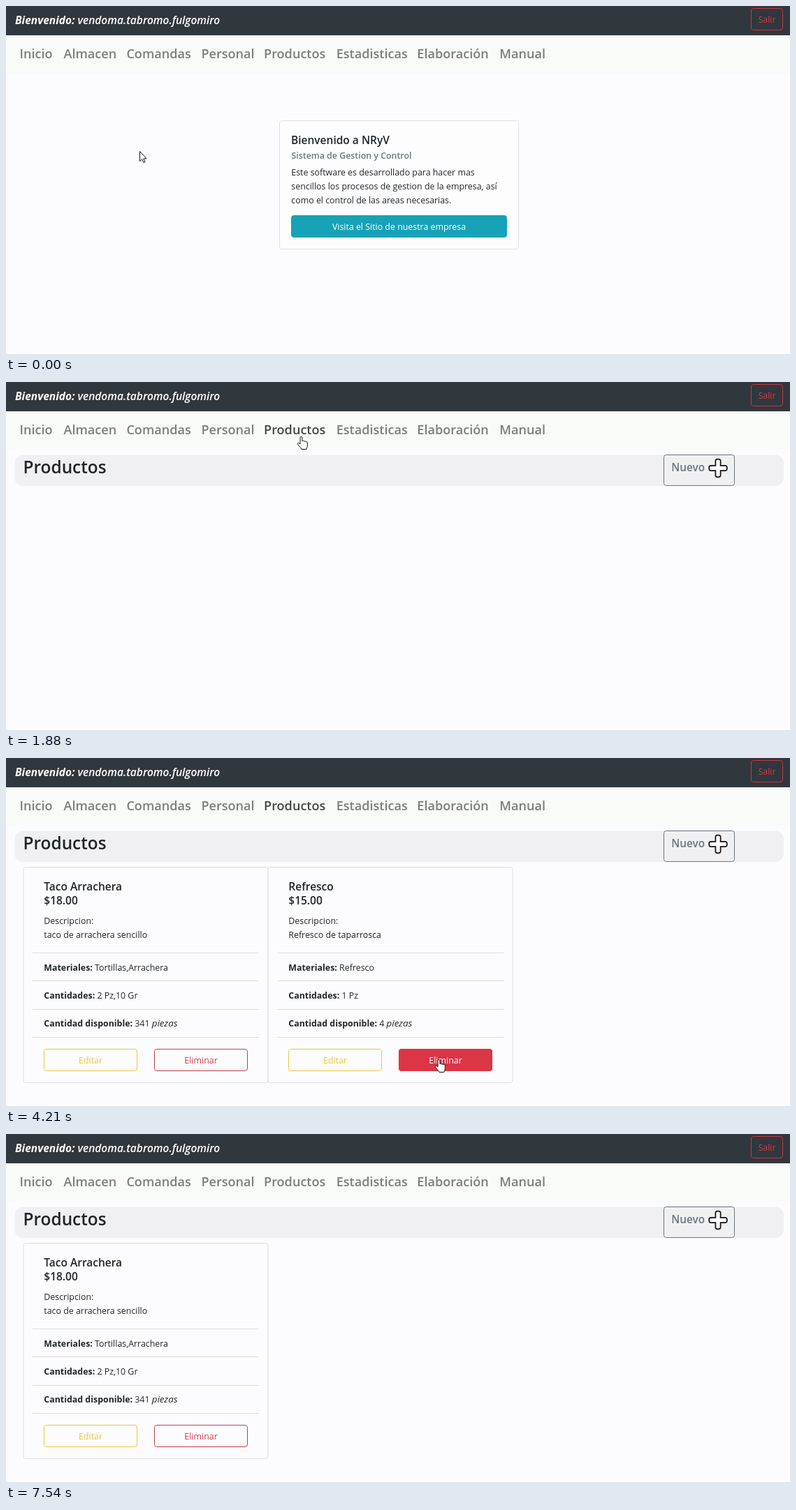
Write an HTML page that moves like this. It is 1122 px wide and 499 px high and loops after 8.04 s.

```html
<!DOCTYPE html>
<html lang="es">
<head>
<meta charset="utf-8">
<title>Productos</title>
<style>
  html, body { margin: 0; width: 100%; height: 100%; overflow: hidden; background: #fcfcfe; }
  svg { display: block; width: 1122px; height: 499px; }
  text { font: 12.4px "Open Sans", "Noto Sans", sans-serif; fill: #212529; white-space: pre; }
  .user { font-size: 15.5px; font-weight: 600; font-style: italic; fill: #fff; }
  .nav { font-size: 18.1px; font-weight: 600; fill: rgba(0, 0, 0, .5); }
  .title { font-size: 24.4px; font-weight: 600; }
  .head { font-size: 15.5px; font-weight: 600; }
  .sub { font-weight: 600; fill: #6c757d; }
  .new { font-size: 15.3px; font-weight: 600; fill: #6c757d; }
  .mid { text-anchor: middle; }
  .b { font-weight: 700; }
  .i { font-size: 13.3px; font-style: italic; }
  .white { fill: #fff; }
  .red { fill: #cf3c4b; }
  .yellow { fill: #ecc43a; }
</style>
</head>
<body>
<svg id="stage" viewBox="0 0 1122 499"></svg>
<script>
const LOOP = 8040, STEP = 1000 / 24;

const text = (x, y, str, cls = "") => `<text x="${x}" y="${y}" class="${cls}">${str}</text>`;
const box = (x, y, w, h, fill, stroke = "none", r = 3.3) =>
  `<rect x="${x}" y="${y}" width="${w}" height="${h}" rx="${r}" fill="${fill}" stroke="${stroke}"/>`;
const group = (id, body) => `<g id="${id}">${body}</g>`;
const span = (cls, str) => `<tspan class="${cls}">${str}</tspan>`;

const links = [["Inicio", 19.5], ["Almacen", 82.5], ["Comandas", 172.4], ["Personal", 279.4],
  ["Productos", 369], ["Estadisticas", 472.7], ["Elaboración", 588.3], ["Manual", 706.3]];

function header() {
  return box(0, 0, 1122, 42, "#30373d", "none", 0) +
    box(0, 42, 1122, 55, "#f9fbf9", "none", 0) +
    text(13, 25.5, span("b", "Bienvenido:") + " vendoma.tabromo.fulgomiro", "user") +
    box(1066.5, 3.5, 45, 31, "none", "#c23a48") +
    text(1089, 24, "Salir", "mid red") +
    links.map(([label, x]) => text(x, 75, label, "nav")).join("");
}

function home() {
  return box(391.5, 164.5, 342, 184, "#fdfdfe", "#dedfe0") +
    text(408, 197.5, "Bienvenido a NRyV", "head") +
    text(408.5, 219, "Sistema de Gestion y Control", "sub") +
    ["Este software es desarrollado para hacer mas",
     "sencillos los procesos de gestion de la empresa, así",
     "como el control de las areas necesarias."]
      .map((line, i) => text(408.3, 242.8 + i * 20, line)).join("") +
    box(408.5, 300.5, 308, 31, "#17a2b8", "#17a2b8") +
    text(562.5, 321, "Visita el Sitio de nuestra empresa", "mid white");
}

function titleBar() {
  return box(12.5, 104.5, 1100.5, 44.5, "#f0f0f2", "none", 12) +
    text(24.5, 130.5, "Productos", "title") +
    box(941.5, 104.5, 101, 44, "none", "#6c757d") +
    text(952.3, 127.5, "Nuevo", "new");
}

const plus = `<path transform="translate(1019 123.5)" fill="#fff" stroke="#111" stroke-width="1.7"
  d="M-3.6-3.6V-10q0-2.8 2.8-2.8h1.6q2.8 0 2.8 2.8v6.4H10q2.8 0 2.8 2.8v1.6q0 2.8-2.8 2.8H3.6V10
  q0 2.8-2.8 2.8h-1.6q-2.8 0-2.8-2.8V3.6H-10q-2.8 0-2.8-2.8v-1.6q0-2.8 2.8-2.8Z"/>`;

function card(x, p) {
  const left = x + 29.3;
  const rows = [["Materiales:", p.materials], ["Cantidades:", p.amounts],
    ["Cantidad disponible:", `${p.stock} ${span("i", "piezas")}`]];
  return box(x, 156.5, 350, 309, "none", "#dedfe0") +
    text(left, 190, p.name, "head") +
    text(left, 209.5, p.price, "head") +
    text(left, 238, "Descripcion:") +
    text(left, 258, p.about) +
    [279.5, 319.5, 360.5, 400.5].map(y => `<path d="M${x + 13} ${y}h324" stroke="#dcdddf"/>`).join("") +
    rows.map(([key, value], i) => text(left, 304.5 + i * 40.3, `${span("b", key)} ${value}`)).join("") +
    box(x + 29.5, 417.5, 133, 31, "none", "#efc63c") +
    text(x + 96, 438, "Editar", "mid yellow") +
    box(x + 187.5, 417.5, 133, 31, "none", "#c83c4b") +
    text(x + 254, 438, "Eliminar", "mid red");
}

const taco = { name: "Taco Arrachera", price: "$18.00", about: "taco de arrachera sencillo",
  materials: "Tortillas,Arrachera", amounts: "2 Pz,10 Gr", stock: 341 };
const soda = { name: "Refresco", price: "$15.00", about: "Refresco de taparrosca",
  materials: "Refresco", amounts: "1 Pz", stock: 4 };

const arrow = `<path id="arrow" d="M.5.5V14.7L3.8 11.6 6 16.5 8.1 15.6 5.9 10.8H10.2Z"
  fill="#fff" stroke="#111" stroke-linejoin="round"/>`;
const hand = `<path id="hand" transform="translate(-6.5 -1)" fill="#fff" stroke="#111" stroke-linejoin="round"
  d="M4.5 11V2a1.5 1.5 0 0 1 3 0V7c.3-1 2.6-.9 2.8.4.5-.8 2.5-.6 2.7.6.6-.5 1.9-.2 1.9 1V13
  c0 2-1 3-1.5 5.5H6.5C6 16.5 3 14.5 1 11.3c-.8-1.5 1-2.5 2-1.5Z"/>`;

const hot = box(562.5, 417.5, 133, 31, "#dc3545", "#dc3545") + text(629, 438, "Eliminar", "mid white");

document.getElementById("stage").innerHTML = header() +
  group("home", home()) +
  group("bar", titleBar()) + group("plus", plus) +
  group("first", card(25, taco)) +
  group("second", card(375, soda) + group("hot", hot)) +
  group("cursor", arrow + hand);

const parts = Object.fromEntries(
  ["home", "bar", "plus", "first", "second", "hot", "cursor", "arrow", "hand"]
    .map(id => [id, document.getElementById(id)]));
const current = document.querySelectorAll(".nav")[4];

// time, x, y of the pointer tip; a fourth value marks an eased approach
const track = [[0, 191, 208], [960, 191, 208], [1540, 423, 79, 1], [2380, 423, 79], [2710, 430, 84],
  [3190, 490, 200], [3750, 583, 364], [4000, 609, 418], [4120, 620, 433], [4830, 621, 433],
  [7250, 620, 434], [7540, 476, 505], [LOOP, 476, 505]];

function pointer(t) {
  const i = Math.max(1, track.findIndex(k => k[0] > t));
  const [t0, x0, y0] = track[i - 1], [t1, x1, y1, ease] = track[i];
  let p = (t - t0) / (t1 - t0);
  if (ease) p = p * p * (3 - 2 * p);
  return [Math.round(x0 + (x1 - x0) * p), Math.round(y0 + (y1 - y0) * p)];
}

const ramp = (t, start, span = 150) => Math.min(1, Math.max(0, (t - start) / span));
const show = (node, on) => node.setAttribute("visibility", on ? "visible" : "hidden");

function draw(now) {
  const t = Math.min(LOOP - 1, Math.floor((now % LOOP + 5) / STEP) * STEP + 5);
  const [x, y] = pointer(t);
  const pointing = (t >= 1480 && t < 2750) || (t >= 4035 && t < 5790);

  show(parts.home, t < 1830);
  show(parts.bar, t >= 1830);
  show(parts.plus, t >= 1875);
  show(parts.first, t >= 2375);
  show(parts.second, t >= 2375 && t < 5790);
  parts.hot.setAttribute("opacity", ramp(t, 4000));
  current.style.fill = `rgba(0,0,0,${0.5 + 0.22 * (ramp(t, 1400, 140) - ramp(t, 5770))})`;

  parts.cursor.setAttribute("transform", `translate(${x} ${y})`);
  show(parts.arrow, !pointing);
  show(parts.hand, pointing);
}

const start = performance.now();
function tick() {
  draw(performance.now() - start);
  requestAnimationFrame(tick);
}
tick();
</script>
</body>
</html>
```
